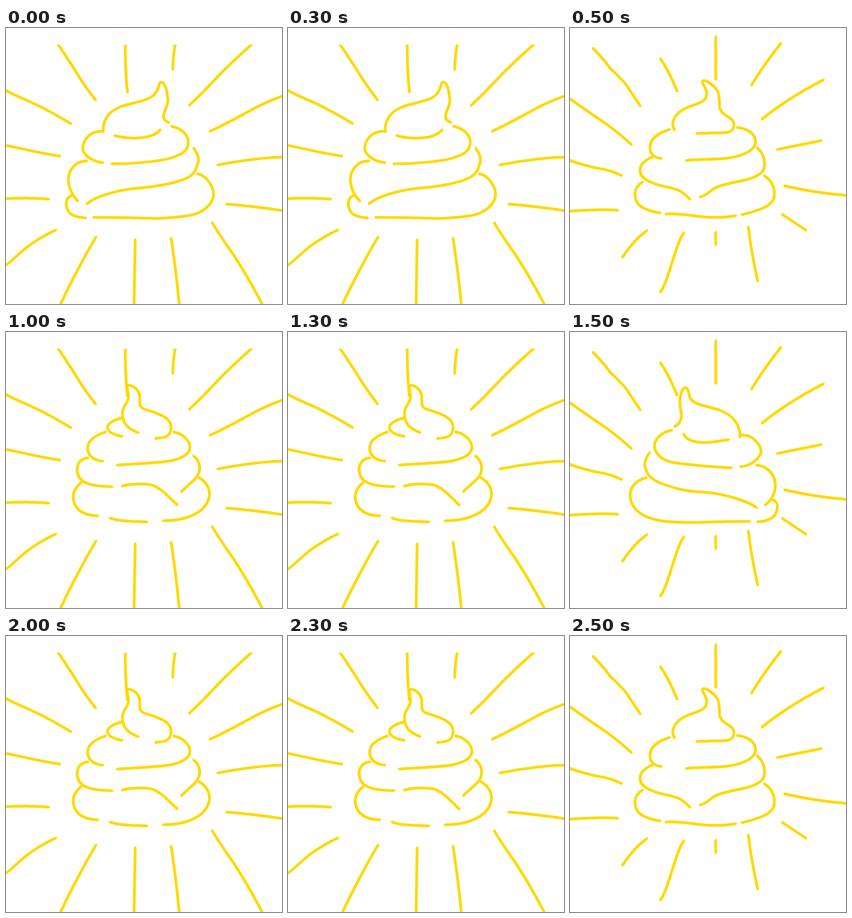
An HTML page that plays this animation: 500x500 px, repeating every 3000 ms.

```html
<!DOCTYPE html>
<html lang="en">
<head>
<meta charset="utf-8">
<title>Swirl</title>
<style>
  html, body { margin: 0; width: 100%; height: 100%; overflow: hidden; background: #fff; }
  svg { display: block; width: 100%; height: 100%; }
  path { fill: none; stroke: #ffd900; stroke-width: 5; stroke-linecap: round; stroke-linejoin: round; }
  .long, .short { animation: 1s step-end infinite; }
  .long { animation-name: first; }
  .short { animation-name: second; visibility: hidden; }
  .pose { animation: 3s step-end infinite; visibility: hidden; }
  .right { animation-name: right; }
  .back { animation-name: back; }
  .front { animation-name: front; }
  .left { animation-name: left; }
  @keyframes first { 0% { visibility: visible } 50%, 100% { visibility: hidden } }
  @keyframes second { 0% { visibility: hidden } 50%, 100% { visibility: visible } }
  @keyframes right { 0% { visibility: visible } 16.666%, 100% { visibility: hidden } }
  @keyframes back {
    0%, 33.333% { visibility: hidden }
    16.666%, 83.333%, 100% { visibility: visible }
  }
  @keyframes front {
    0%, 50%, 83.333%, 100% { visibility: hidden }
    33.333%, 66.666% { visibility: visible }
  }
  @keyframes left {
    0%, 66.666%, 100% { visibility: hidden }
    50% { visibility: visible }
  }
</style>
</head>
<body>
<svg viewBox="0 0 500 500">
  <clipPath id="top"><path d="M0 30H500V500H0Z"/></clipPath>

  <g class="long" clip-path="url(#top)">
    <path d="M93 28Q115 60 129 83T162 130"/>
    <path d="M216 28Q216 80 220 116M220 111V115"/>
    <path d="M307 28Q303 45 302 75"/>
    <path d="M447 28Q400 70 378 94T332 140"/>
    <path d="M502 123Q470 134 436 153T370 187"/>
    <path d="M502 234Q460 234 384 248"/>
    <path d="M502 331Q450 323 400 319"/>
    <path d="M374 353Q380 365 406 402T465 502"/>
    <path d="M299 381Q307 430 314 502"/>
    <path d="M234 384L232 502"/>
    <path d="M163 379Q150 400 130 438T98 502"/>
    <path d="M90 366Q50 385 25 408T-3 431"/>
    <path d="M77 310Q45 307 -2 309"/>
    <path d="M97 232Q60 226 -2 212"/>
    <path d="M117 173Q70 145 40 132T-2 112"/>
  </g>

  <g class="short">
    <path d="M42 37Q60 55 72 72Q85 84 97 97Q107 110 127 141"/>
    <path d="M164 56Q176 72 194 114"/>
    <path d="M264 16V93"/>
    <path d="M382 28Q350 68 329 103"/>
    <path d="M459 94Q390 130 348 165"/>
    <path d="M455 204L376 220"/>
    <path d="M389 286Q440 298 498 303"/>
    <path d="M385 338L427 366"/>
    <path d="M323 361Q330 415 340 458"/>
    <path d="M264 370V392"/>
    <path d="M206 371C190 395 178 460 164 478"/>
    <path d="M139 367Q115 385 95 415"/>
    <path d="M86 330Q50 328 -2 332"/>
    <path d="M93 267Q75 258 50 254Q20 248 -2 239"/>
    <path d="M111 211Q85 187 60 170T-2 127"/>
  </g>

  <g class="pose right">
    <path d="M176 188C175 165 187 151 207 143S258 133 269 120S276 98 281 98S291 108 292 120C296 140 288 146 286 156S287 167 295 171"/>
    <path d="M197 195Q220 201 243 199Q268 197 279 185"/>
    <path d="M172 187C150 187 140 205 139 216S152 241 175 244"/>
    <path d="M300 178C318 182 332 194 330 210S314 230 300 235S240 246 192 246"/>
    <path d="M146 241C125 240 112 260 113 276S122 306 130 313"/>
    <path d="M340 218C347 227 350 236 348 243C345 255 343 265 325 273S270 288 240 290S165 303 147 318"/>
    <path d="M118 304C107 309 108 320 112 330S130 343 144 344"/>
    <path d="M347 264C365 268 377 290 376 303S360 336 330 340S285 345 270 345Q210 343 159 343"/>
  </g>

  <g class="pose back">
    <path d="M189 184C183 175 186 160 203 149S243 138 247 124S238 102 240 97S252 98 262 107S270 130 271 143C273 160 297 160 297 175S285 190 265 190L230 191"/>
    <path d="M180 184C160 190 146 200 145 215S155 236 165 236"/>
    <path d="M303 180C325 183 336 193 336 206S320 230 290 235S235 236 211 240"/>
    <path d="M153 232C135 238 125 250 127 260C128 275 155 284 175 288S200 293 217 310"/>
    <path d="M339 217C350 226 354 240 352 252S335 272 310 277S265 286 255 295S240 305 236 306"/>
    <path d="M131 279C118 288 117 297 118 305C120 325 140 331 163 335"/>
    <path d="M353 268C370 280 371 295 370 305C368 322 345 330 312 338"/>
    <path d="M174 337C210 335 225 343 260 343S290 341 300 340"/>
  </g>

  <g class="pose front">
    <path d="M219 97C227 95 240 102 242 115S238 135 252 140S299 152 299 172S285 191 271 193"/>
    <path d="M219 97C219 106 225 115 220 125S210 138 211 152C213 170 226 177 239 182"/>
    <path d="M209 156C192 160 182 168 184 175S195 186 210 189"/>
    <path d="M180 181C155 190 147 200 148 212S158 232 175 234"/>
    <path d="M304 181C322 185 334 198 333 210S318 229 300 233S245 238 202 241"/>
    <path d="M148 228C132 230 128 242 129 252C131 272 150 280 192 280"/>
    <path d="M340 225C350 232 353 245 349 256S332 275 318 289"/>
    <path d="M211 279C225 275 245 275 258 276C280 279 295 300 310 313"/>
    <path d="M136 273C122 284 121 295 122 303C125 322 140 332 166 333"/>
    <path d="M350 264C368 275 370 290 368 299C363 325 330 342 285 342"/>
    <path d="M189 337C200 342 220 343 255 344"/>
  </g>

  <g class="pose left">
    <path d="M190 171C200 166 204 155 201 143S199 120 201 112S206 101 210 101S215 112 217 118C221 132 250 134 272 142S309 168 308 190"/>
    <path d="M206 185C212 199 235 201 250 200S270 198 287 195"/>
    <path d="M184 178C165 181 154 195 153 205C153 225 175 235 190 237S250 244 292 246"/>
    <path d="M310 187C332 185 345 205 346 215S330 243 309 244"/>
    <path d="M144 219C136 230 134 240 137 248C142 268 165 276 200 285C220 290 240 289 260 292S320 305 338 318"/>
    <path d="M338 241C360 243 371 260 372 276S363 307 354 313"/>
    <path d="M138 264C115 270 108 285 109 299C112 325 135 335 155 340S200 345 220 345S280 343 325 343"/>
    <path d="M368 304C377 308 377 318 373 328S355 343 340 344"/>
  </g>
</svg>
</body>
</html>
```
